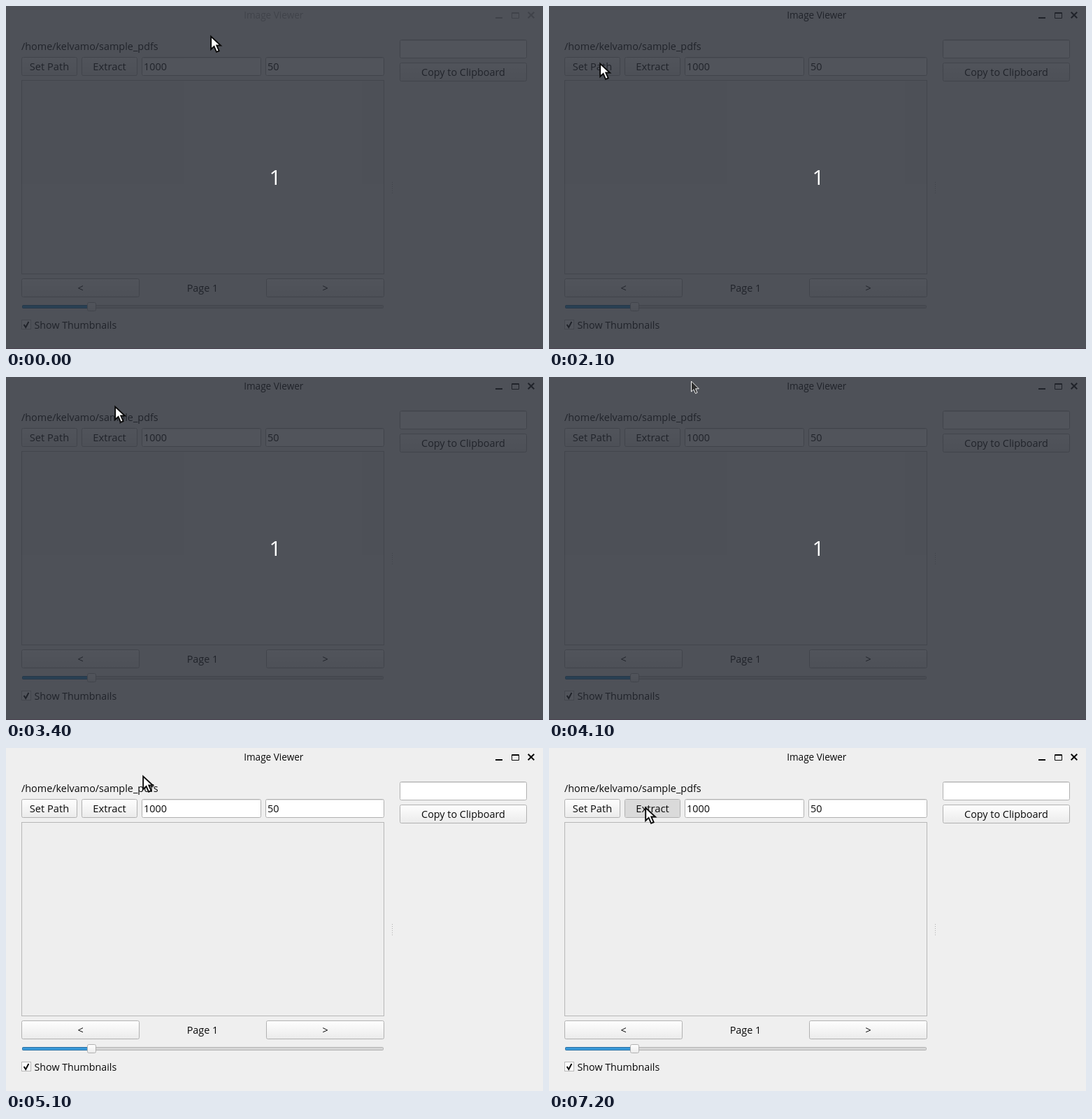
Write an HTML page that moves like this. It is 768 px wide and 491 px high and loops after 8 s.

```html
<!DOCTYPE html>
<html lang="en">
<head>
<meta charset="utf-8">
<title>Image Viewer</title>
<style>
  html, body { margin: 0; width: 100%; height: 100%; overflow: hidden; background: #efefef; }
  svg { display: block; width: 768px; height: 491px; }
  text { font: 14.4px "Open Sans", "Noto Sans", sans-serif; fill: #0a0a0a; }
  .mid { text-anchor: middle; }
  .box { stroke: #b1b1b1; rx: 2px; }
  .button { fill: url(#face); }
  .field { fill: #fff; }

  .titlebar, .dim, .pressed, .arrow, .pointer { animation: 8s step-end infinite; }
  .titlebar { animation-name: focus; }
  .titlebar text { fill: currentColor; font-size: 13.6px; }
  .dim { animation-name: undim; }
  .pressed { animation-name: press; }
  .pointer { animation-name: pointer; }
  .arrow { animation-name: move; }

  @keyframes focus { 0% { color: #a8a8a8; } 6.25%, 100% { color: #0a0a0a; } }
  @keyframes undim { 0% { opacity: 1; } 53.75%, 100% { opacity: 0; } }
  @keyframes press { 0% { opacity: 0; } 90%, 100% { opacity: 1; } }
  @keyframes pointer { 0% { opacity: 0; } 51.25% { opacity: 1; } 57.5%, 100% { opacity: 0; } }
  @keyframes move {
    0% { transform: translate(292px, 41px); opacity: 1; }
    21.25% { transform: translate(283px, 42px); }
    22.5% { transform: translate(235px, 55px); }
    23.75% { transform: translate(130px, 74px); }
    25% { transform: translate(36px, 81px); }
    26.25% { transform: translate(72px, 80px); }
    31.25% { transform: translate(65px, 82px); }
    33.75% { transform: translate(36px, 80px); }
    35% { transform: translate(107px, 83px); }
    36.25% { transform: translate(152px, 80px); }
    37.5% { transform: translate(148px, 76px); }
    38.75% { transform: translate(125px, 72px); }
    41.25% { transform: translate(132px, 62px); }
    42.5% { transform: translate(155px, 40px); }
    43.75% { transform: translate(185px, 16px); }
    45% { transform: translate(198px, 7px); }
    48.75% { transform: translate(202px, 4px); opacity: 1; }
    51.25% { opacity: 0; }
    57.5% { transform: translate(212px, 12px); opacity: 1; }
    58.75% { transform: translate(230px, 28px); }
    62.5% { transform: translate(226px, 26px); }
    63.75% { transform: translate(195px, 38px); }
    65% { transform: translate(150px, 60px); }
    66.25% { transform: translate(124px, 77px); }
    67.5% { transform: translate(133px, 75px); }
    71.25%, 100% { transform: translate(137px, 83px); opacity: 1; }
  }
</style>
</head>
<body>
<svg viewBox="0 0 768 491">
  <defs>
    <linearGradient id="face" x2="0" y2="1">
      <stop stop-color="#fefefe"/>
      <stop offset="1" stop-color="#ebebeb"/>
    </linearGradient>
    <linearGradient id="blue" x2="0" y2="1">
      <stop stop-color="#2f8fd0"/>
      <stop offset="1" stop-color="#43a3e2"/>
    </linearGradient>
  </defs>

  <rect width="768" height="491" fill="#efefef"/>

  <g class="titlebar">
    <text class="mid" x="382.8" y="18">Image Viewer</text>
    <path d="M700 16h10v2h-10z" fill="currentColor"/>
    <path d="M723.5 9.5h10v8h-10zM723 10.5h11" fill="none" stroke="currentColor"/>
    <path d="M746.7 8.7l8.6 8.6m0-8.6l-8.6 8.6" stroke="currentColor" stroke-width="2"/>
  </g>

  <text x="22" y="63">/home/kelvamo/sample_pdfs</text>

  <rect class="box button" x="22.5" y="73.5" width="79" height="26"/>
  <rect class="box button" x="108.5" y="73.5" width="79" height="26"/>
  <rect class="pressed" x="109" y="74" width="78" height="25" rx="1" fill="#dadada"/>
  <text class="mid" x="62" y="92" style="font-size:14.65px">Set Path</text>
  <text class="mid" x="148" y="92" style="font-size:14.8px">Extract</text>

  <rect class="box field" x="194.5" y="73.5" width="170" height="26"/>
  <rect class="box field" x="371.5" y="73.5" width="169" height="26"/>
  <rect class="box field" x="563.5" y="48.5" width="181" height="26"/>
  <path d="M196 74.5h167M373 74.5h166M565 49.5h178" stroke="#e4e4e4"/>
  <text x="197" y="92">1000</text>
  <text x="374" y="92">50</text>

  <rect class="box button" x="563.5" y="81.5" width="181" height="26"/>
  <text class="mid" x="654" y="100">Copy to Clipboard</text>

  <rect x="22.5" y="106.5" width="518" height="277" fill="#eeeeee" stroke="#b7b7b7"/>
  <path d="M552.5 252v17" stroke="#b0b0b0" stroke-dasharray="1 2"/>

  <rect class="box button" x="22.5" y="390.5" width="168" height="26"/>
  <rect class="box button" x="372.5" y="390.5" width="168" height="26"/>
  <text class="mid" x="106.5" y="409">&lt;</text>
  <text class="mid" x="281" y="409">Page 1</text>
  <text class="mid" x="456.5" y="409">&gt;</text>

  <rect x="23.5" y="428.5" width="516" height="4" rx="1" fill="#d6d6d6" stroke="#b3b3b3"/>
  <rect x="23.5" y="428.5" width="97" height="4" rx="1" fill="url(#blue)" stroke="#2a72a5"/>
  <rect class="box button" x="116.5" y="424.5" width="12" height="12"/>

  <rect x="22.5" y="449.5" width="13" height="13" fill="#fff" stroke="#b7b7b7"/>
  <path d="M25.6 456l2.6 4 4.2-8" fill="none" stroke="#0a0a0a" stroke-width="2"/>
  <text x="40.5" y="462" style="font-size:14.25px">Show Thumbnails</text>

  <g class="dim">
    <rect width="768" height="491" fill="#262a32" fill-opacity=".8"/>
    <path d="M0 490.5h768" stroke="#4b4351"/>
    <text x="376.6" y="256" style="font-size:30px;fill:#fff">1</text>
  </g>

  <g class="pointer">
    <path transform="translate(203 5)" d="M.5 1v15l3.4-3.2 2.6 5.8 2.6-1.2-2.5-5.6h4.7z"
          fill="#2d2d2d" stroke="#f4f4f4"/>
  </g>
  <g class="arrow">
    <path d="M1.2 2.6v18.4l4.4-4.2 3.5 8 3.6-1.6-3.4-7.7h5.8z"
          fill="#fff" stroke="#0a0a0a" stroke-width="1.9"/>
  </g>
</svg>
</body>
</html>
```
